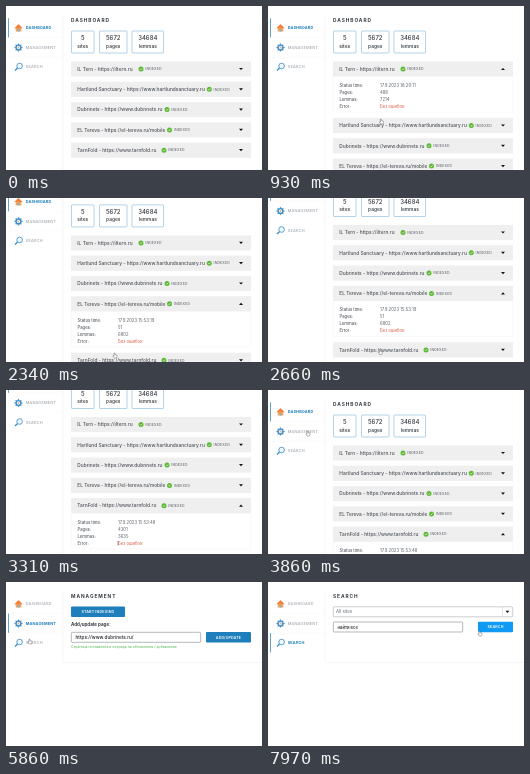
These frames come from a looping animation (256 px wide and 164 px high, 8 s). An HTML page with a canvas:

```html
<!DOCTYPE html>
<html lang="en">
<head>
<meta charset="utf-8">
<title>Admin panel</title>
<style>
  html, body { margin: 0; width: 100%; height: 100%; overflow: hidden; background: #fff; }
  canvas { display: block; width: 256px; height: 164px; }
</style>
</head>
<body>
<canvas id="stage"></canvas>
<script>
const W = 256, H = 164, LOOP = 8000;
const BLUE = '#1f7fbc', BRIGHT = '#0f9af3', INK = '#34393f', MUTED = '#a3a9b0';
const canvas = document.getElementById('stage');
const ctx = canvas.getContext('2d');
const dpr = window.devicePixelRatio || 1;
canvas.width = W * dpr;
canvas.height = H * dpr;

const sites = [
  { label: 'IL Tern - https://iltern.ru', chip: 135, info: ['17.9.2023 18:20:11', '488', '7214'] },
  { label: 'Hartlund Sanctuary - https://www.hartlundsanctuary.ru', chip: 203.3, info: ['17.9.2023 18:21:52', '611', '9212'] },
  { label: 'Dubrinets - https://www.dubrinets.ru', chip: 161, info: ['17.9.2023 18:23:37', '221', '7821'] },
  { label: 'EL Tereva - https://el-tereva.ru/mobile', chip: 163.5, info: ['17.9.2023 15:53:19', '51', '6802'] },
  { label: 'TarnFold - https://www.tarnfold.ru', chip: 158, info: ['17.9.2023 15:53:48', '4301', '3635'] }
];
const infoLabels = ['Status time:', 'Pages:', 'Lemmas:', 'Error:'];
const clicks = [660, 1140, 1550, 2000, 2890];
const SLIDE = 90, PANEL = 36.2, PITCH = 20.3;

// time, x, y, pointer kind used from this point on
const path = [
  [140, 124, 164, 'arrow'], [480, 116, 64, 'hand'], [780, 116, 64, 'hand'],
  [970, 112, 119, 'hand'], [1240, 112, 119, 'hand'], [1340, 110, 137, 'hand'],
  [1640, 110, 137, 'arrow'], [1720, 109, 151, 'arrow'], [1830, 108, 155, 'hand'],
  [2480, 108, 155, 'hand'], [2720, 112, 151, 'hand'], [2970, 112, 151, 'beam'],
  [3540, 112, 151, 'arrow'], [3860, 39, 41, 'hand'], [4120, 39, 41, 'arrow'],
  [4480, 96, 55, 'beam'], [4900, 96, 55, 'arrow'], [5160, 220, 55, 'hand'],
  [5450, 220, 55, 'arrow'], [5860, 23, 57, 'hand'], [6120, 23, 57, 'arrow'],
  [6340, 92, 45, 'beam'], [7260, 92, 45, 'arrow'], [7690, 211, 49, 'arrow'],
  [7970, 211, 49, 'hand'], [8000, 211, 49, 'hand']
];
const scrollKeys = [[2260, 0], [2340, 18], [2440, 28.5], [3320, 28.5], [3600, 0]];

const clamp = v => Math.max(0, Math.min(1, v));
const smooth = v => v * v * (3 - 2 * v);

function segment(keys, t) {
  let i = 0;
  while (i < keys.length - 2 && t >= keys[i + 1][0]) i++;
  const a = keys[i], b = keys[i + 1];
  return { a, b, p: clamp((t - a[0]) / (b[0] - a[0])) };
}

function scrollAt(t) {
  const { a, b, p } = segment(scrollKeys, t);
  return a[1] + (b[1] - a[1]) * p;
}

function pointerAt(t) {
  const { a, b, p } = segment(path, t);
  const k = smooth(p);
  const kind = p < 1 ? a[3] : b[3];
  return { x: a[1] + (b[1] - a[1]) * k, y: a[2] + (b[2] - a[2]) * k, kind };
}

function openness(i, t) {
  const shown = smooth(clamp((t - clicks[i]) / SLIDE));
  const hidden = i < 4 ? smooth(clamp((t - clicks[i + 1]) / SLIDE)) : 0;
  return shown - hidden;
}

function text(str, x, y, size, { color = INK, weight = 500, space = 0, align = 'left' } = {}) {
  ctx.font = `${weight} ${size}px Inter, "Open Sans", sans-serif`;
  ctx.letterSpacing = space + 'px';
  ctx.textAlign = align;
  ctx.textBaseline = 'alphabetic';
  ctx.fillStyle = color;
  // y is the middle of the capitals
  ctx.fillText(str, x, y + size * 0.364);
}

function rect(x, y, w, h, fill) {
  ctx.fillStyle = fill;
  ctx.fillRect(x, y, w, h);
}

function round(x, y, w, h, r, fill, stroke, width = 0.6) {
  ctx.beginPath();
  ctx.roundRect(x, y, w, h, r);
  if (fill) { ctx.fillStyle = fill; ctx.fill(); }
  if (stroke) { ctx.strokeStyle = stroke; ctx.lineWidth = width; ctx.stroke(); }
}

function poly(points, fill, stroke, width = 0.5) {
  ctx.beginPath();
  points.forEach(([x, y]) => ctx.lineTo(x, y));
  ctx.closePath();
  if (fill) { ctx.fillStyle = fill; ctx.fill(); }
  if (stroke) { ctx.strokeStyle = stroke; ctx.lineWidth = width; ctx.stroke(); }
}

function line(points, stroke, width) {
  ctx.beginPath();
  points.forEach(([x, y]) => ctx.lineTo(x, y));
  ctx.strokeStyle = stroke;
  ctx.lineWidth = width;
  ctx.stroke();
}

function disc(x, y, r, fill, stroke, width) {
  ctx.beginPath();
  ctx.arc(x, y, r, 0, Math.PI * 2);
  if (fill) { ctx.fillStyle = fill; ctx.fill(); }
  if (stroke) { ctx.strokeStyle = stroke; ctx.lineWidth = width; ctx.stroke(); }
}

function triangle(x, y, up) {
  const d = up ? -1 : 1;
  poly([[x - 2, y - 1.1 * d], [x + 2, y - 1.1 * d], [x, y + 1.1 * d]], '#111');
}

const icons = [
  () => {
    rect(9.7, 21.5, 5.6, 4, '#f7a452');
    poly([[8.3, 22.2], [12.5, 18], [16.7, 22.2]], '#f0813f');
    rect(11.6, 23, 1.8, 2.5, '#7fb2d6');
  },
  () => {
    for (let i = 0; i < 8; i++) {
      const a = i * Math.PI / 4, c = Math.cos(a), s = Math.sin(a);
      line([[12.5 + c * 2, 41.5 + s * 2], [12.5 + c * 4.1, 41.5 + s * 4.1]], '#5a9fd0', 1.3);
    }
    disc(12.5, 41.5, 2.4, '#fff', '#3d8fc9', 1.4);
    disc(12.5, 41.5, 0.9, '#f0a868');
  },
  () => {
    line([[11.6, 62], [9, 64.6]], '#3d8fc9', 1.4);
    disc(13.6, 60, 2.8, '#f2f9fd', '#4a98cd', 0.9);
  }
];

function sidebar(active, bottom) {
  rect(56.7, 10, 0.5, bottom - 10, '#eaecee');
  rect(57, bottom, 199, 0.5, '#eaecee');
  ['DASHBOARD', 'MANAGEMENT', 'SEARCH'].forEach((name, i) => {
    const y = 21.8 + i * 19.5, on = i === active;
    if (i) rect(3, y - 10, 54, 0.5, '#f5f6f7');
    if (on) rect(2, y - 9.7, 0.7, 19.3, BLUE);
    icons[i]();
    text(name, 19.7, y, 3.9, { color: on ? BLUE : MUTED, weight: on ? 700 : 500, space: on ? 0.12 : 0.2 });
  });
}

function title(str) {
  text(str, 65, 14.6, 4.8, { weight: 700, space: 0.95 });
}

function button(str, x, y, w, h, hover) {
  round(x, y, w, h, 1, hover ? BRIGHT : BLUE);
  text(str, x + w / 2, y + h / 2, 3.7, { color: '#fff', weight: 600, space: 0.15, align: 'center' });
}

function stat(x, w, value, label) {
  round(x, 25, w, 22, 0.6, '#fff', '#7db5db', 0.6);
  text(value, x + w / 2, 32.3, 6, { align: 'center' });
  text(label, x + w / 2, 39.8, 4.9, { align: 'center' });
}

function siteRow(site, y, open) {
  if (open > 0) {
    ctx.save();
    ctx.beginPath();
    ctx.rect(64, y + 7.5, 182, PANEL * open);
    ctx.clip();
    round(65.2, y + 7, 179.6, PANEL, 0, '#fff', '#f3f3f3', 0.5);
    infoLabels.forEach((label, i) => {
      const ly = y + 16.5 + i * 7;
      text(label, 71.5, ly, 4.2, { color: '#5a6067' });
      const error = i === 3;
      text(error ? 'Без ошибок' : site.info[i], 112, ly, 4.25,
        { color: error ? '#dd5c45' : '#5a6067', weight: 400 });
    });
    ctx.restore();
  }
  rect(65, y - 7.6, 180, 15.2, '#efefef');
  text(site.label, 71.3, y, 4.8, { color: '#4c5157', space: 0.01 });
  disc(site.chip, y, 2.5, '#5cb934');
  line([[site.chip - 1.1, y], [site.chip - 0.3, y + 0.9], [site.chip + 1.2, y - 0.8]], '#fff', 0.6);
  text('INDEXED', site.chip + 4.3, y, 3.5, { color: '#6c7278', space: 0.13 });
  triangle(235, y, open > 0.5);
}

function dashboard(t) {
  const opens = sites.map((_, i) => openness(i, t));
  const extra = opens.reduce((a, b) => a + b, 0) * PANEL;
  sidebar(0, 163 + extra);
  title('DASHBOARD');
  stat(65.5, 22.5, '5', 'sites');
  stat(93.5, 27.5, '5672', 'pages');
  stat(126, 31.5, '34684', 'lemmas');
  let y = 63;
  sites.forEach((site, i) => {
    siteRow(site, y, opens[i]);
    y += PITCH + opens[i] * PANEL;
  });
}

function management(t, pointer) {
  sidebar(1, 80);
  title('MANAGEMENT');
  button('START INDEXING', 65, 24.5, 54, 10.5);
  text('Add/update page:', 65, 42.3, 4.5, { weight: 700 });
  round(65.3, 50.3, 129.4, 10, 1, '#fff', '#85898d');
  if (t >= 4760) text('https://www.dubrinets.ru/', 69.5, 55.2, 4.7, { color: '#1c1f22' });
  button('ADD/UPDATE', 200, 50, 45, 10.6, pointer.x > 200);
  if (t >= 5260) {
    text('Страница поставлена в очередь на обновление / добавление', 65, 64.4, 3.5,
      { color: '#4fb54a', weight: 400 });
  }
}

function search(t, pointer) {
  sidebar(2, 80);
  title('SEARCH');
  round(65.3, 24.8, 179.4, 10, 1, '#fff', '#a9adb1');
  rect(234, 25, 0.5, 9.6, '#c9ccd0');
  text('All sites', 68, 29.8, 4.4, { color: '#6b7177', weight: 400 });
  triangle(239.5, 29.8, false);
  round(65.3, 40, 129.4, 10, 1, '#fff', '#85898d');
  let count = t < 6620 ? 0 : Math.min(7, 1 + Math.floor((t - 6620) / 63));
  count += (t >= 7140) + (t >= 7210);
  text('найти все'.slice(0, count), 69.5, 45, 4.2, { color: '#1c1f22' });
  button('SEARCH', 210, 39.7, 35, 10.6, pointer.x > 209.5);
}

function drawPointer({ x, y, kind }) {
  ctx.save();
  ctx.translate(x, y);
  if (kind === 'hand') {
    poly([[0, 0], [0.8, 0], [1, 1.7], [2.8, 2], [3, 3.6], [2.4, 5], [0.3, 5], [-1.1, 3.1], [-0.6, 2.7], [0, 3.2]],
      '#fff', '#555', 0.45);
  } else if (kind === 'beam') {
    line([[0, 0], [0, 4.5]], '#333', 0.5);
  } else {
    poly([[0, 0], [0, 4.4], [1.1, 3.5], [1.8, 5], [2.5, 4.7], [1.8, 3.2], [3.1, 3.1]], '#111', '#fff', 0.3);
  }
  ctx.restore();
}

function draw(t) {
  const pointer = pointerAt(t);
  ctx.setTransform(dpr, 0, 0, dpr, 0, 0);
  rect(0, 0, W, H, '#fff');
  ctx.save();
  ctx.translate(0, -scrollAt(t));
  if (t < 4060) dashboard(t);
  else if (t < 6060) management(t, pointer);
  else search(t, pointer);
  ctx.restore();
  if (t >= 140) drawPointer(pointer);
}

function tick() {
  draw(performance.now() % LOOP);
  requestAnimationFrame(tick);
}
tick();
</script>
</body>
</html>
```
